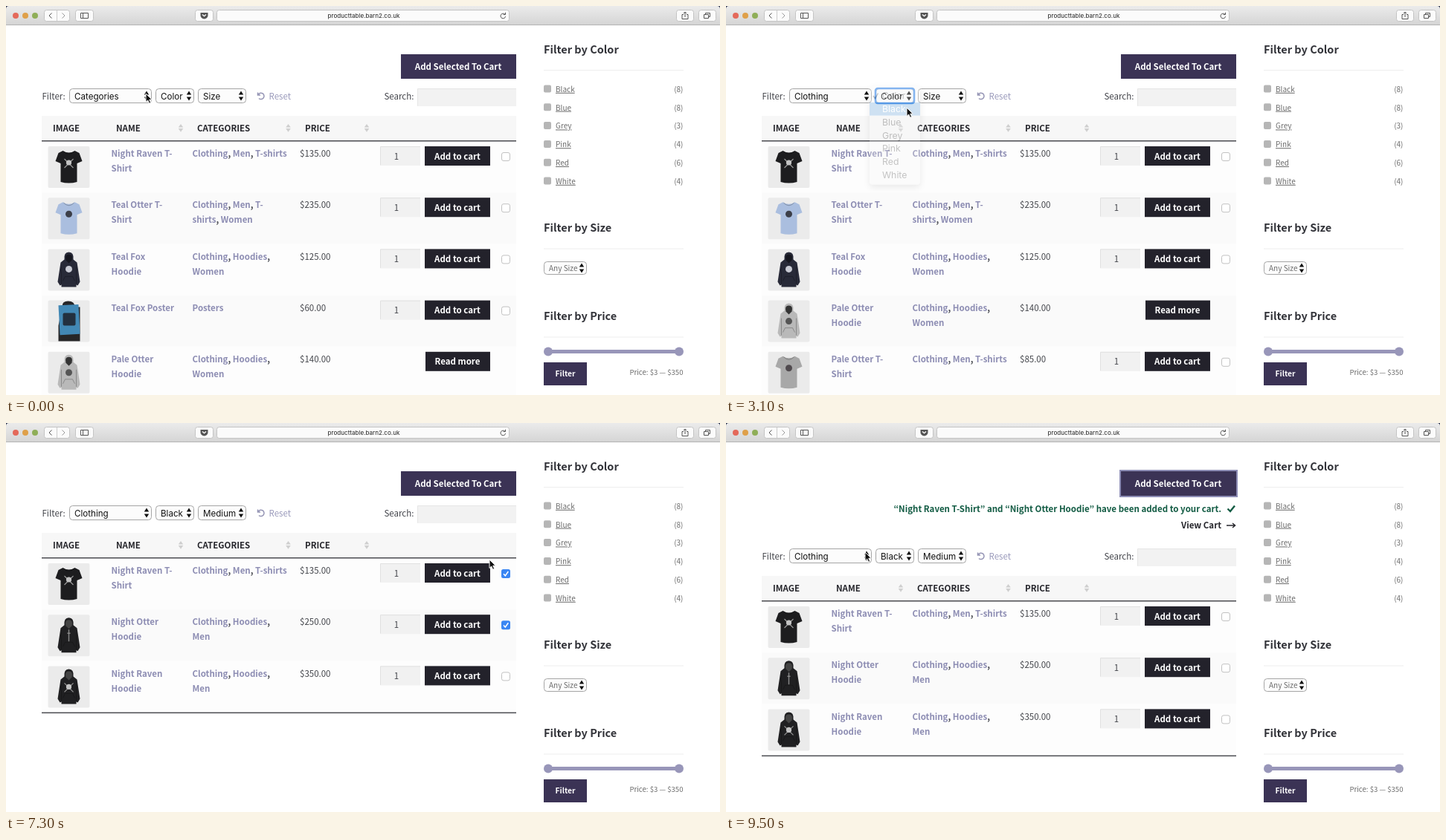
Write an HTML page that moves like this. It is 960x524 px and loops after 9.9 s.

```html
<!DOCTYPE html>
<html lang="en">
<head>
<meta charset="utf-8">
<title>Product table filters</title>
<style>
html, body { margin: 0; width: 100%; height: 100%; overflow: hidden; background: #fff; }
svg { display: block; width: 960px; height: 524px; }
text { font: 11.5px "Noto Sans CJK KR", "Noto Sans CJK JP", "Noto Sans CJK SC", sans-serif; fill: #43454b; }
.b { font-weight: 700; fill: #26262c; }
.link { font-weight: 700; fill: #8d8db3; }
.white { font-weight: 700; fill: #fff; }
.h { font-size: 14.5px; font-weight: 700; fill: #33343a; }
.side { font-size: 10px; fill: #6d6d6d; }
.ui { font: 11.6px Inter, Roboto, sans-serif; fill: #111; }
.url { font: 8.1px Inter, Roboto, sans-serif; fill: #222; }
.mid { text-anchor: middle; }
.end { text-anchor: end; }
.u { text-decoration: underline; }
</style>
</head>
<body>
<svg viewBox="0 0 960 524">
  <defs>
    <linearGradient id="bar" x2="0" y2="1"><stop stop-color="#ebebeb"/><stop offset="1" stop-color="#d5d5d5"/></linearGradient>
    <filter id="shadow" x="-30%" y="-30%" width="160%" height="170%"><feDropShadow dx="0" dy="4" stdDeviation="5" flood-opacity=".3"/></filter>
  </defs>
  <g id="static"></g>
  <g id="live"></g>
</svg>
<script>
const LOOP = 9900, STEP = 100, ROW = 69.2;
const PURPLE = '#3b3355', LAVENDER = '#8d8db5';
const FILTERED = { category: 1600, color: 3500, size: 5200 };
const CHECKED = [6400, 6800];
const CLICK = 8000, LOADED = 8600;

const text = (x, y, s, cls = '') => `<text x="${x}" y="${y}" class="${cls}">${s}</text>`;
const rect = (x, y, w, h, fill, extra = '') => `<rect x="${x}" y="${y}" width="${w}" height="${h}" fill="${fill}" ${extra}/>`;
const circle = (x, y, r, fill) => `<circle cx="${x}" cy="${y}" r="${r}" fill="${fill}"/>`;
const path = (d, fill, extra = '') => `<path d="${d}" fill="${fill}" ${extra}/>`;
const line = (d, color, width = 1) => path(d, 'none', `stroke="${color}" stroke-width="${width}"`);
const group = (x, y, s, extra = '') => `<g transform="translate(${x} ${y})" ${extra}>${s}</g>`;

const arrows = (x, y, w, h, gap, fill) =>
  path(`M${x - w} ${y - gap}h${2 * w}l${-w} ${-h}zM${x - w} ${y + gap}h${2 * w}l${-w} ${h}z`, fill);

const selectBox = (x, y, w, h, focused) =>
  rect(x + .5, y + .5, w - 1, h - 1, '#fcfcfc', 'rx="4" stroke="#a5a5a5"') +
  (focused ? rect(x, y, w, h, 'none', 'rx="3" stroke="#5c9ded" stroke-width="2.6"') : '') +
  arrows(x + w - 7, y + h / 2, 3.2, 5, 1.4, '#111');

// Browser toolbar and sidebar
function browser() {
  const button = (x, w) => rect(x + .5, 5.5, w - 1, 15, '#fbfbfb', 'rx="3" stroke="#c4c4c4"');
  const dark = '#555';
  return rect(0, 0, 960, 25, 'url(#bar)') + rect(0, 25, 960, 1, '#b4b4b4') +
    path('M0 0H4Q0 0 0 4zM960 0H956Q960 0 960 4z', '#28304a') +
    circle(13, 13, 4, '#e4695a') + circle(26, 13, 4, '#dfa04a') + circle(39, 13, 4, '#8fae58') +
    button(51, 35) + line('M68.5 6V20', '#ccc') + line('M61.5 9.5L58 13L61.5 16.5', dark) + line('M75.5 9.5L79 13L75.5 16.5', '#999') +
    button(93, 25) + line('M100.500 9.500h10v7h-10zM103.500 9.500v7', dark) +
    button(254, 25) + path('M261.500 9h10v3.500a5 5 0 0 1-10 0z', dark) + line('M264 11.500l2.500 2.300l2.500-2.300', '#fff', 1.2) +
    button(283, 394) + text(481, 16, 'producttable.barn2.co.uk', 'url mid') +
    line('M671 11.500A3.300 3.300 0 1 0 671.600 14M671.500 8.800v2.800h-2.800', dark) +
    button(901, 24) + line('M911 11.500h-2v6h8v-6h-2M913 15V8M911 10l2-2l2 2', dark) +
    button(931, 24) + line('M938.500 11.500h6v5h-6zM940.500 11V9.500h6v5h-1.500', dark);
}

function sidebar() {
  const heading = (y, s) => text(723, y, s, 'h') + rect(723, y + 22.5, 188, 1, '#eee');
  const colors = { Black: 8, Blue: 8, Grey: 3, Pink: 4, Red: 6, White: 4 };
  const items = Object.entries(colors).map(([name, count], i) => group(0, i * 24.8,
    rect(723, 106.5, 10, 10, '#b6b6b6', 'rx="2"') + text(739, 115.8, name, 'side u') + text(910.5, 115.8, `(${count})`, 'side end')));
  return heading(63.5, 'Filter by Color') + items.join('') +
    heading(304, 'Filter by Size') + selectBox(723, 344, 58, 18) + text(730, 357, 'Any Size', 'side') +
    heading(423, 'Filter by Price') +
    rect(729, 463, 176, 5, '#9896b9') + circle(729, 465.5, 6, '#9896b9') + circle(905, 465.5, 6, '#9896b9') +
    rect(723, 480, 58, 31, PURPLE) + '<text x="752" y="499.300" class="white mid" style="font-size:10.300px">Filter</text>' +
    '<text x="910.500" y="497" class="side end" style="font-size:9.600px">Price: $3 — $350</text>';
}

// Product pictures, drawn in a 56 px square
const SHIRT = 'M20 6Q28 11 36 6L42 9L46 20L39 23V48Q28 51 17 48V23L10 20L14 9Z';
const HOODIE = 'M22 14Q21 4 28 4Q35 4 34 14L39 18L43 44L40 49L38 48V51H18V48L16 49L13 44L17 18Z';
const shirt = (fill, print) => path(SHIRT, fill) + line('M21 7Q28 14 35 7', 'rgba(0,0,0,.25)') + print;
const hoodie = (fill, hood, print) => path(HOODIE, fill) + path('M24 15Q22 7 28 7Q34 7 32 15L28 19Z', hood) +
  line('M20 43L23 37H33L36 43M18 24V47M38 24V47', 'rgba(0,0,0,.25)') + print;
const bones = y => line(`M22 ${y - 5}L34 ${y + 7}M34 ${y - 5}L22 ${y + 7}`, '#999', 1.2) + circle(28, y, 3.6, '#c4c4c4');
const badge = (y, fill) => circle(28, y, 4.5, fill);

const pictures = {
  nightShirt: shirt('#1d1d1f', bones(22)),
  tealShirt: shirt('#aabedf', badge(22, '#3c3f49')),
  tealHoodie: hoodie('#282a38', '#16171f', badge(27, '#c9cbd4')),
  poster: path('M19 8Q19 1 27 1Q36 1 36 9H43V55H14V34Z', '#262628') + rect(15, 6, 27, 40, '#4288b5', 'transform="rotate(-3 28 26)"') +
    rect(20, 17, 17, 17, '#23303f', 'rx="2"'),
  paleHoodie: hoodie('#b9b9b9', '#333', badge(28, '#555')),
  paleShirt: shirt('#a8a8a8', badge(22, '#504a4e')),
  nightHoodie: hoodie('#202022', '#444', line('M28 20V36M26 25H30', '#8a8a8a', 1.4)),
  bonesHoodie: hoodie('#202022', '#444', bones(28)),
};

const product = (name, categories, price, picture, inStock = true) => ({ name, categories, price, picture, inStock });
const nightShirt = product(['Night Raven T-', 'Shirt'], ['Clothing, Men, T-shirts'], 135, 'nightShirt');
const tealShirt = product(['Teal Otter T-', 'Shirt'], ['Clothing, Men, T-', 'shirts, Women'], 235, 'tealShirt');
const tealHoodie = product(['Teal Fox', 'Hoodie'], ['Clothing, Hoodies,', 'Women'], 125, 'tealHoodie');
const poster = product(['Teal Fox Poster'], ['Posters'], 60, 'poster');
const paleHoodie = product(['Pale Otter', 'Hoodie'], ['Clothing, Hoodies,', 'Women'], 140, 'paleHoodie', false);
const paleShirt = product(['Pale Otter T-', 'Shirt'], ['Clothing, Men, T-shirts'], 85, 'paleShirt');
const nightHoodie = product(['Night Otter', 'Hoodie'], ['Clothing, Hoodies,', 'Men'], 250, 'nightHoodie');
const bonesHoodie = product(['Night Raven', 'Hoodie'], ['Clothing, Hoodies,', 'Men'], 350, 'bonesHoodie');
const duskHoodie = product(['Night Fox', 'Hoodie'], ['Clothing, Hoodies,', 'Women'], 120, 'tealHoodie');

function visibleProducts(t) {
  if (t >= FILTERED.size) return [nightShirt, nightHoodie, bonesHoodie];
  if (t >= FILTERED.color) return [nightShirt, nightHoodie, bonesHoodie, duskHoodie];
  if (t >= FILTERED.category) return [nightShirt, tealShirt, tealHoodie, paleHoodie, paleShirt];
  return [nightShirt, tealShirt, tealHoodie, poster, paleHoodie];
}

const checkbox = on => on
  ? rect(666, 197, 12, 12, '#3a86f3', 'rx="2.500"') + line('M669 203.200L671.300 205.800L675.300 200', '#fff', 1.5)
  : rect(666.5, 197.5, 11, 11, '#fff', 'rx="2.500" stroke="#c2c2c2"');

function tableRow(p, i, checked) {
  const lines = (x, rows) => rows.map((s, k) =>
    text(x, 203.3 + 20 * k, s.replace(/,/g, '<tspan fill="#43454b">,</tspan>'), 'link')).join('');
  const buttonX = p.inStock ? 563 : 564;
  return group(0, i * ROW,
    rect(48, 182, 638, ROW, i % 2 ? '#fafafa' : '#fdfdfd') +
    rect(56.5, 189, 56, 56, '#ebebeb', 'rx="2"') + group(56.5, 189, pictures[p.picture]) +
    lines(141.5, p.name) + lines(250.5, p.categories) + text(395, 203.3, `$${p.price}.00`) +
    (p.inStock ? rect(503.5, 189, 53.5, 26, '#f1f1f1') + line('M503.500 214.500V189.500H557', '#e0e0e0') +
      text(525, 206.7, '1', 'mid') + checkbox(checked) : '') +
    rect(buttonX, 189, 651 - buttonX, 26, '#23222b') +
    text(607, 206.7, p.inStock ? 'Add to cart' : 'Read more', 'white mid'));
}

// Drop-down filters
const menus = [
  { x: 85, w: 111, items: ['Categories', 'Clothing', 'Hoodies', 'Men', 'Posters', 'T-shirts', 'Women'], choice: 1, open: 600, hover: 900, pick: 1200, blur: 2100 },
  { x: 201, w: 52, items: ['Color', 'Black', 'Blue', 'Grey', 'Pink', 'Red', 'White'], choice: 1, open: 2100, hover: 2500, pick: 2900, blur: 4200 },
  { x: 258, w: 65, items: ['Size', 'Large', 'Medium', 'Small'], choice: 2, open: 4200, hover: 4500, pick: 4800, blur: CHECKED[0] },
];
const SHIFT_TO_VALUE = 300;

const menuButton = (m, t) => selectBox(m.x, 111, m.w, 20, t >= m.open && t < m.blur) +
  text(m.x + 7, 125.5, m.items[t >= m.pick + SHIFT_TO_VALUE ? m.choice : 0], 'ui');

function popup(m, t) {
  const opacity = t < m.open ? 0 : Math.min(1, 1 - (t - m.pick) / 270);
  if (opacity <= 0) return '';
  const x = m.x - 8, w = m.w + 16, pitch = 17.7, active = t >= m.hover ? m.choice : 0;
  const items = m.items.map((s, i) => {
    const y = 121 + i * pitch, on = i === active;
    return (on ? rect(x, y - 8.8, w, pitch, '#4790cf') : '') +
      `<text x="${x + 17}" y="${y + 4.4}" class="ui" style="font-size:12.300px;fill:${on ? '#fff' : '#222'}">${s}</text>` +
      (i ? '' : line(`M${x + 5} ${y}l2.500 3.500l4-7`, on ? '#fff' : '#222', 1.5));
  });
  return `<g opacity="${opacity}">` +
    rect(x, 107, w, 27 + (m.items.length - 1) * pitch, '#f7f7f7', 'rx="4" filter="url(#shadow)"') + items.join('') + '</g>';
}

function productTable(t) {
  const rows = visibleProducts(t);
  const bottom = 182 + rows.length * ROW;
  const heads = [[63, 'IMAGE'], [148, 'NAME'], [257, 'CATEGORIES'], [402, 'PRICE']];
  const content =
    text(48.5, 126, 'Filter:') + menus.map(m => menuButton(m, t)).join('') +
    line('M339.300 119A4.200 4.200 0 1 1 340 124.500M338.500 116.500V120H342', '#9494b4', 1.5) +
    '<text x="353.500" y="126" style="fill:#9a9abb">Reset</text>' +
    text(508.5, 126, 'Search:') + rect(553, 111, 133, 24, '#f2f2f2') + line('M553.500 134.500V111.500H686', '#e6e6e6') +
    rect(48, 148, 638, 33, '#f7f7f7') + heads.map(([x, s]) => text(x, 168.6, s, 'b')).join('') +
    [235, 379.5, 485].map(x => arrows(x, 164.3, 3.3, 4.6, .8, '#cfcfcf')).join('') +
    rows.map((p, i) => tableRow(p, i, t >= CHECKED[i] && t < LOADED)).join('') +
    rect(48, 181, 638, 1.5, '#4a4b50') + rect(48, bottom, 638, 1.5, '#4a4b50');
  const loading = t >= CLICK && t < LOADED;
  return group(0, t >= LOADED ? 58 : 0, content, loading ? 'opacity=".45"' : '') + (loading ? spinner(t) : '');
}

function spinner(t) {
  let dots = '';
  for (let i = 0; i < 8; i++) {
    const a = (i / 8 + t / 1000) * 2 * Math.PI;
    dots += circle(10 * Math.cos(a), 10 * Math.sin(a), 1.4 + i * .18, '#55565a');
  }
  return group(367.5, 230, dots);
}

function cartButton(t, [x, y]) {
  const hovered = x > 531 && x < 686 && y > 65 && y < 98;
  return (t >= CLICK ? rect(530, 64, 157, 35, 'none', `stroke="${hovered ? '#c3c3d3' : LAVENDER}" stroke-width="2"`) : '') +
    rect(531, 65, 155, 33, hovered ? LAVENDER : PURPLE) + text(608, 86, 'Add Selected To Cart', 'white mid');
}

const message = () =>
  '<text x="666" y="119.500" class="b end" style="fill:#135c44">“Night Raven T-Shirt” and “Night Otter Hoodie” have been added to your cart.</text>' +
  line('M674.500 115.500L678 119L684 111.500', '#135c44', 2.4) +
  text(666, 142.3, 'View Cart', 'b end') + line('M673 138H684M681 135L684.500 138L681 141', '#26262c', 1.5);

// Pointer: [time, x, y]
const track = [
  [0, 188, 118], [600, 188, 118], [900, 165, 137], [1500, 162, 138], [1700, 240, 117], [2400, 240, 117],
  [2600, 243, 137], [3400, 243, 137], [3800, 306, 120], [4200, 309, 118], [4500, 300, 154], [5000, 300, 154],
  [5300, 363, 159], [5700, 470, 178], [6200, 671, 201], [6500, 671, 201], [6700, 671, 271], [7100, 671, 271],
  [7300, 650, 184], [7700, 627, 75], [8400, 627, 75], [8900, 192, 152], [9200, 187, 174], [LOOP, 187, 174],
];
function pointerAt(t) {
  const i = track.findIndex(k => k[0] > t);
  const [t0, x0, y0] = track[i - 1], [t1, x1, y1] = track[i], f = (t - t0) / (t1 - t0);
  return [x0 + (x1 - x0) * f, y0 + (y1 - y0) * f];
}

function pointer(t, [x, y]) {
  const menuOpen = menus.some(m => t >= m.open && t < m.pick + 270);
  const overHeader = t < CLICK && !menuOpen && x < 500 && y > 148 && y < 181;
  const outline = 'stroke="#fff" stroke-width="1" stroke-linejoin="round"';
  if (overHeader) return group(x, y, path('M0 1Q-1.500-1-3 1L-1 7L-3 6Q-5 6-4 8L0 13H6L8 9V5Q7 4 6 5Q5 3 4 4.500Q3 3 1.500 4Z', '#fff', 'stroke="#222" stroke-width="1.100" stroke-linejoin="round"'));
  const busy = t >= CLICK && t < LOADED && x > 600
    ? circle(7, 17, 7, '#2478d6') + path('M7 17L0 15A7 7 0 0 1 6 10ZM7 17L3 23A7 7 0 0 0 12 22Z', '#5aaeea') : '';
  return group(x, y, busy + path('M0 0V11.500L2.700 9L4.600 13.300L6.700 12.400L4.800 8.200H8.300Z', '#111', outline));
}

function draw(t) {
  const p = pointerAt(t);
  document.getElementById('live').innerHTML = cartButton(t, p) + (t >= LOADED ? message() : '') +
    productTable(t) + menus.map(m => popup(m, t)).join('') + pointer(t, p);
}

document.getElementById('static').innerHTML = browser() + sidebar();
let shown = -1;
function tick() {
  const t = Math.floor(performance.now() % LOOP / STEP) * STEP;
  if (t !== shown) draw(shown = t);
  requestAnimationFrame(tick);
}
tick();
</script>
</body>
</html>
```
